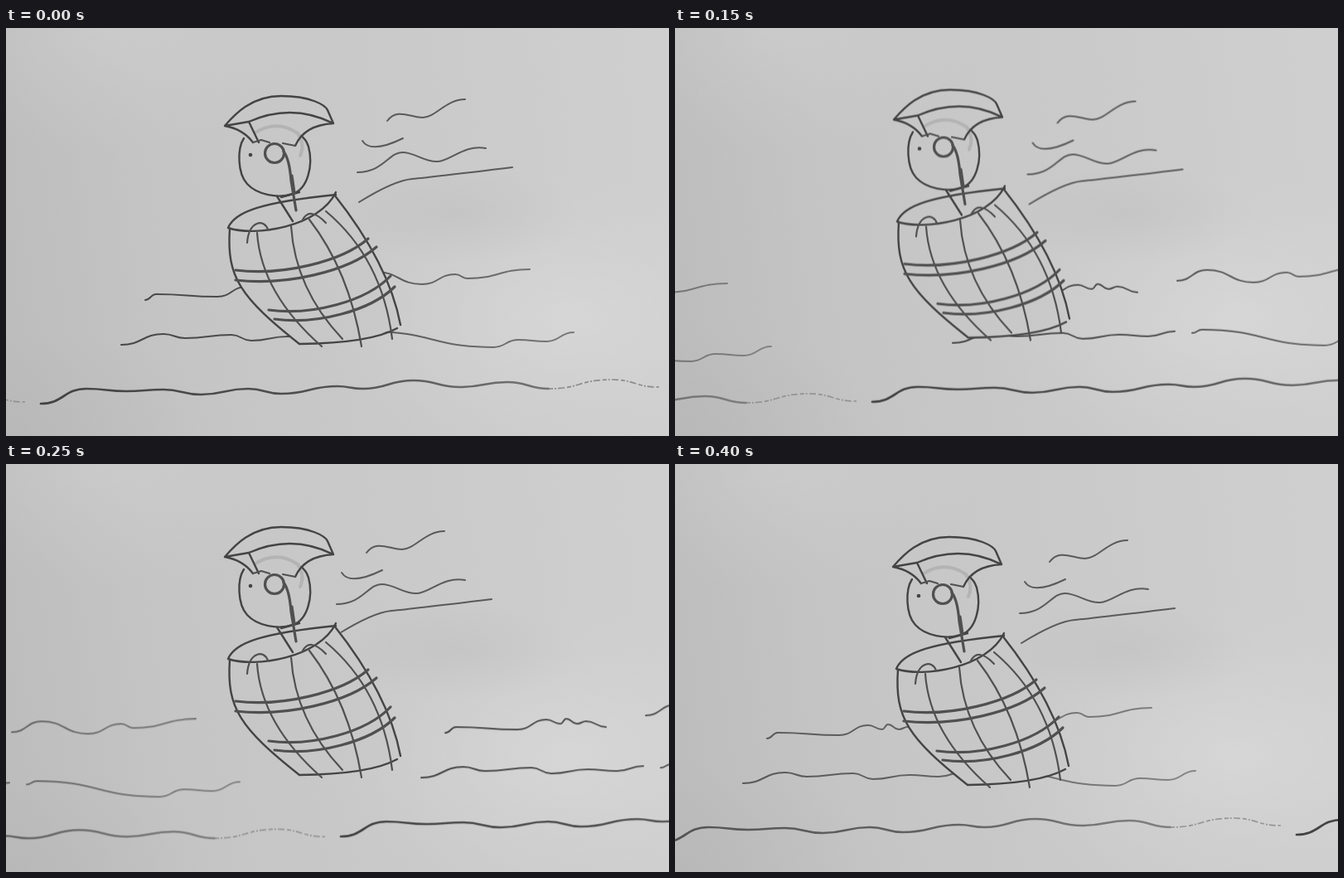
Animation of 800 by 492 pixels, one loop 450 ms. Source, as an HTML page:

```html
<!DOCTYPE html>
<html lang="en">
<head>
<meta charset="utf-8">
<title>Barrel at sea</title>
<style>
  html, body { margin: 0; width: 100%; height: 100%; overflow: hidden; background: #c8c8c8; }
  svg { display: block; width: 100%; height: 100%; }
  .ink { fill: none; stroke: #444; stroke-width: 2.4; stroke-linecap: round; stroke-linejoin: round; }
  .thin { stroke: #505050; stroke-width: 2.2; }
  .bold { stroke: #505050; stroke-width: 3.2; }
  .wind { stroke: #5a5a5a; stroke-width: 2; }
  .wave { stroke: url(#fade); stroke-width: 2; }
  .swell { stroke-width: 2.7; }
  .foam { stroke: #8b8b8b; stroke-width: 1.7; stroke-dasharray: 5 2 2 2 8 3; stroke-linecap: butt; }
  .smudge { fill: none; stroke: #acacac; stroke-width: 4; opacity: .7; }
</style>
</head>
<body>
<svg viewBox="0 0 800 492" preserveAspectRatio="none">
  <defs>
    <linearGradient id="paper" gradientUnits="userSpaceOnUse" x1="0" y1="300" x2="800" y2="200">
      <stop offset="0" stop-color="#bdbdbd"/>
      <stop offset=".25" stop-color="#c5c5c5"/>
      <stop offset="1" stop-color="#cfcfcf"/>
    </linearGradient>
    <linearGradient id="fade" gradientUnits="userSpaceOnUse" x1="42" y1="0" x2="790" y2="0">
      <stop offset="0" stop-color="#424242"/>
      <stop offset=".45" stop-color="#505050"/>
      <stop offset="1" stop-color="#858585"/>
    </linearGradient>
    <radialGradient id="light">
      <stop offset="0" stop-color="#d9d9d9" stop-opacity=".8"/>
      <stop offset="1" stop-color="#d4d4d4" stop-opacity="0"/>
    </radialGradient>
    <radialGradient id="shade">
      <stop offset="0" stop-color="#aaa" stop-opacity=".5"/>
      <stop offset="1" stop-color="#aaa" stop-opacity="0"/>
    </radialGradient>
  </defs>

  <rect width="800" height="492" fill="url(#paper)"/>
  <ellipse cx="680" cy="350" rx="300" ry="180" fill="url(#light)"/>
  <ellipse cx="120" cy="0" rx="260" ry="150" fill="url(#light)" opacity=".4"/>
  <ellipse cx="550" cy="225" rx="150" ry="60" fill="url(#shade)" opacity=".4"/>
  <ellipse cx="0" cy="492" rx="280" ry="130" fill="url(#shade)" opacity=".5"/>

  <g id="right"></g>
  <g id="left" opacity=".85"></g>

  <g id="gust" class="ink wind">
    <path d="M460 112C472 96 488 108 503 108S531 86 554 86"/>
    <path d="M430 136Q440 152 479 133"/>
    <path d="M424 174C455 174 462 150 478 150S505 162 521 161 553 140 579 145"/>
    <path d="M426 210Q468 184 490 182T611 168"/>
  </g>

  <g id="sailor" class="ink">
    <!-- barrel -->
    <path fill="url(#paper)" stroke="none" d="M268 241C276 221 310 210 398 201Q462 284 476 358Q440 380 354 381C282 324 266 300 270 242"/>
    <path d="M268 241C276 221 310 210 398 201M268 241C300 252 378 240 398 198"/>
    <path d="M270 242C266 300 282 324 354 381Q440 380 472 362M396 201Q462 284 476 358"/>
    <path class="thin" d="M303 247Q308 320 381 384M344 239Q349 315 406 375M366 231Q414 293 429 384M386 221Q454 278 466 375"/>
    <path class="thin" d="M291 259C293 232 312 230 316 243M357 233Q366 214 386 235"/>
    <g id="hoops" class="bold"></g>
    <!-- head -->
    <path d="M287 133C279 145 279 175 291 188S328 206 346 200S371 166 365 143Q362 134 356 130"/>
    <path d="M327 203L346 233M332 204L354 198"/>
    <circle cx="295" cy="153" r="2.3" fill="#444" stroke="none"/>
    <ellipse class="bold" cx="324" cy="151" rx="11.5" ry="11.5"/>
    <path class="bold" d="M335 149Q342 158 344 184L350 220M345 178L348 199"/>
    <!-- hat -->
    <path class="smudge" d="M301 126Q327 110 352 127Q361 140 355 154"/>
    <path d="M264 118C276 104 296 82 332 82S385 93 388 99L395 115Q345 90 293 113L264 118Q286 122 298 138M293 113L305 138M395 115Q360 117 349 142"/>
    <path class="thin" d="M298 138L308 135L318 138M334 139L349 142"/>
  </g>
</svg>
<script>
const FRAME = 50;
const STEPS = 9;
const PERIOD = 765; // spacing of the two wave trains

// Key poses; steps in between are interpolated, then held.
const poses = [
  { at: 0, drift: 0, bob: 0, gust: [0, 0] },
  { at: 2, drift: 92, bob: -6, gust: [10, 10] },
  { at: 4, drift: 300, bob: -9, gust: [-7, -5] },
  { at: 5, drift: 362, bob: -6, gust: [-25, -5] },
  { at: 6, drift: 493, bob: 2, gust: [-11, -3] },
  { at: 8, drift: 708, bob: 6, gust: [-8, 6] }
];

const $ = id => document.getElementById(id);
const mix = (a, b, k) => a + (b - a) * k;

function poseAt(step) {
  const next = Math.max(1, poses.findIndex(p => p.at >= step));
  const a = poses[next - 1], b = poses[next];
  const k = (step - a.at) / (b.at - a.at);
  return {
    step,
    drift: mix(a.drift, b.drift, k),
    bob: mix(a.bob, b.bob, k),
    gust: a.gust.map((v, i) => mix(v, b.gust[i], k))
  };
}

function animate(id, place) {
  const frames = Array.from({ length: STEPS + 1 }, (_, i) => {
    const [x, y] = place(poseAt(Math.min(i, STEPS - 1)));
    return { transform: `translate(${x}px, ${y}px)`, offset: i / STEPS, easing: "step-end" };
  });
  $(id).animate(frames, { duration: STEPS * FRAME, iterations: Infinity });
}

function path(parent, kind, d) {
  const node = document.createElementNS("http://www.w3.org/2000/svg", "path");
  node.setAttribute("class", kind);
  node.setAttribute("d", d);
  parent.append(node);
}

// Wave line given by its crests and troughs, level at each of them.
function wave(parent, kind, turns) {
  const points = turns.split(" ").map(p => p.split(",").map(Number));
  const d = points.slice(1).map(([x, y], i) => {
    const [px, py] = points[i], mid = (px + x) / 2;
    return `C${mid} ${py} ${mid} ${y} ${x} ${y}`;
  });
  path(parent, "ink wave " + kind, `M${points[0]}` + d.join(""));
}

function drawSea(sea) {
  wave(sea, "", "168,327 181,320 255,323 290,311 307,316 314,310 327,316 338,313 362,320");
  wave(sea, "", "410,306 446,293 502,308 542,296 557,301 632,290");
  wave(sea, "", "139,381 190,368 216,373 272,369 296,376 340,371 375,373 407,367");
  wave(sea, "", "428,369 440,365 588,384 618,375 652,377 685,366");
  wave(sea, "swell", "42,452 97,434 145,437 190,435 235,441 292,434 332,440 400,431 430,434 492,424 548,432 605,426 655,434");
  wave(sea, "foam", "655,434 730,423 788,432");
}

function hoop(x, y, endX, endY) {
  const w = endX - x;
  path($("hoops"), "", `M${x} ${y}C${x + w * .35} ${y + 7} ${x + w * .8} ${y - 10} ${endX} ${endY}`);
}

drawSea($("right"));
drawSea($("left"));
hoop(277, 292, 437, 254);
hoop(277, 304, 447, 264);
hoop(317, 340, 464, 299);
hoop(324, 351, 469, 312);

animate("right", p => [p.drift, 1 - p.step * .75]);
animate("left", p => [p.drift - PERIOD, p.step > 6 ? mix(17, 4, (p.step - 6) / 2) : 19 - p.step / 3]);
animate("gust", p => p.gust);
animate("sailor", p => [p.step > 5 ? -1 : 0, p.bob]);
</script>
</body>
</html>
```
